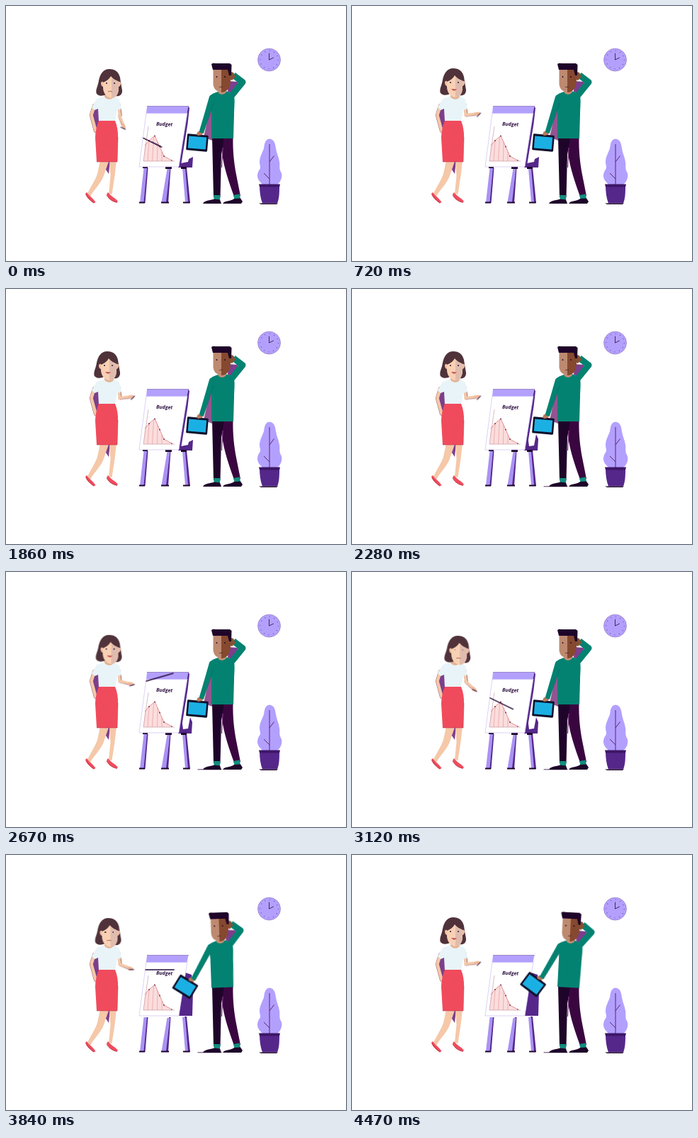
Animation of 480x360 px, one loop 4500 ms. Source, as an HTML page:

```html
<!DOCTYPE html>
<html lang="en">
<head>
<meta charset="utf-8">
<title>Budget talk</title>
<style>
  html, body { margin: 0; width: 100%; height: 100%; overflow: hidden; background: #fff; }
  svg { display: block; width: 100vw; height: 100vh; }

  .ink { fill: #1e0429; }
  .lilac { fill: #b3a0fd; }
  .violet { fill: #55278a; }
  .shade { fill: #7c3f8c; }
  .skin { fill: #f5c8a8; }
  .red { fill: #f04b5c; }
  .green { fill: #038271; }
  .line { fill: none; stroke: #27083a; stroke-width: .8; stroke-linecap: round; stroke-linejoin: round; }
  .limb { fill: none; stroke-linecap: round; stroke-linejoin: round; }

  .move { animation: 4.5s ease-in-out infinite; }
  .cut { animation: 4.5s step-end infinite; }

  .w-head { animation-name: w-head; transform-origin: 145px 128px; }
  .w-fore { animation-name: w-fore; transform-origin: 160px 154px; }
  .stick { animation-name: stick; transform-origin: 181px 154px; }
  .w-eyes { animation-name: blink; transform-origin: 144px 108px; }
  .smile { animation-name: smile; }
  .frown { animation-name: frown; }
  .m-body { animation-name: m-body; transform-origin: 306px 186px; }
  .m-arm { animation-name: m-arm; transform-origin: 291px 128px; }
  .tablet { animation-name: tablet; transform-origin: 275px 180px; }
  .back-a { animation-name: back-a; }
  .back-b { animation-name: back-b; }
  .back-c { animation-name: back-c; }
  .gap { animation-name: gap; }
  .floor { animation-name: floor; }
  .tip { animation-name: tip; }

  @keyframes w-head {
    0% { transform: translate(3px, 1px); }
    13%, 54% { transform: none; }
    66%, 72% { transform: translate(6px, 2px) rotate(1deg); }
    85.3% { transform: translate(1.5px, 1px); }
    97%, 100% { transform: none; }
  }
  @keyframes w-fore {
    0% { transform: rotate(69deg); }
    13%, 54% { transform: rotate(-6deg); }
    66%, 72% { transform: rotate(43deg); }
    85.3% { transform: rotate(22deg); }
    97%, 100% { transform: rotate(-6deg); }
  }
  @keyframes stick {
    0% { transform: rotate(-43deg); }
    13%, 54% { transform: rotate(-39deg); }
    66%, 72% { transform: rotate(-17deg); }
    85.3% { transform: rotate(-22deg); }
    97%, 100% { transform: rotate(-39deg); }
  }
  @keyframes blink {
    0%, 66% { transform: none; }
    68%, 71% { transform: scaleY(.35); }
    73%, 100% { transform: none; }
  }
  @keyframes smile { 0% { opacity: 0; } 10% { opacity: 1; } 60% { opacity: 0; } 92% { opacity: 1; } }
  @keyframes frown { 0% { opacity: 1; } 10% { opacity: 0; } 60% { opacity: 1; } 92% { opacity: 0; } }
  @keyframes m-body {
    0%, 72% { transform: none; }
    81%, 86% { transform: rotate(-2.2deg); }
    97%, 100% { transform: rotate(3deg); }
  }
  @keyframes m-arm {
    0%, 72% { transform: none; }
    81%, 86% { transform: rotate(13deg); }
    97%, 100% { transform: rotate(10deg); }
  }
  @keyframes tablet {
    0%, 72% { transform: none; }
    81%, 86% { transform: rotate(16deg); }
    97%, 100% { transform: rotate(19deg); }
  }
  @keyframes back-a { 0% { opacity: 1; } 42% { opacity: 0; } }
  @keyframes back-b { 0% { opacity: 0; } 42% { opacity: 1; } 76% { opacity: 0; } }
  @keyframes back-c { 0% { opacity: 0; } 76% { opacity: 1; } }
  @keyframes gap { 0% { opacity: 1; } 76% { opacity: 0; } }
  @keyframes floor { 0% { opacity: 0; } 42% { opacity: 1; } }
  @keyframes tip { 0% { opacity: 0; } 28% { opacity: 1; } 36% { opacity: 0; } }
</style>
</head>
<body>
<svg viewBox="0 0 480 360">
  <defs>
    <clipPath id="board"><path d="M199 141H258L256 151 244 227H188L198 151Z"/></clipPath>
  </defs>

  <!-- clock -->
  <circle class="lilac" cx="371.5" cy="76" r="16" stroke="#8a6cb8" stroke-width=".6"/>
  <circle cx="371.5" cy="76" r="12.8" fill="none" stroke="#5a3a8c" stroke-width="1.2" stroke-dasharray=".8 5.902"/>
  <path class="line" d="M371.5 67V76L377.5 73"/>

  <!-- plant -->
  <path class="lilac" d="M372 187.500C366 188 365 194 364 201C362 207 358 213 358 220C358 225 360 227 358.500 230C354 236 354 242 357.500 247L362 252H383C388 249 391 240 388.500 235C385 229 387 226 386 220C385 213 382 208 381 201C380 193 378 188 372 187.500Z"/>
  <path d="M372 195V252M372 220L378.500 211.500M372 244L364 236" fill="none" stroke="#5a2577"/>
  <path class="violet" d="M358 252H386C386 262 386 271 383 278.500H362C359 271 358 262 358 252Z"/>
  <path d="M357 251.500H387L386 255.500H358Z" fill="#3d1666"/>
  <path class="ink" d="M357 278.500H384L382 280H360Z"/>

  <!-- easel -->
  <g class="violet">
    <path class="cut back-a" d="M258 216L264 213 263 228H246L247 222 257 220Z"/>
    <path class="cut back-b" d="M246 228L248 207 250 222 257 221 260 205 263 212 262 228Z"/>
    <path class="cut back-c" d="M253 166L262 169 264 192 263 227H244Z"/>
  </g>
  <path class="violet" d="M198 229H200.500L196.500 278H193ZM230 229H232.500L229 278H224ZM252 228H255L260 278H256Z"/>
  <path fill="#a993f4" d="M194.500 229H199L194.500 277H189ZM227.500 230H231.500L226 277H219.500ZM249 229H253L257 277H253Z"/>
  <path class="ink" d="M188 276.500H196V278.500H188ZM219 276.500H230V278.500H219ZM250 276.500H259.500V278.500H250Z"/>
  <g class="cut gap">
    <path class="ink" d="M193 227H200V229H193ZM225 227H234V230H225ZM247 227H255V230H247Z"/>
    <path class="violet" d="M257 141L259 144 256.500 166 246.500 228H243L255 151Z"/>
  </g>
  <path d="M198 151H256L244 227H188Z" fill="#fff" stroke="#c3b4f3" stroke-width=".6"/>
  <path class="lilac" d="M199 141.500H257.500L255.500 151.500H198Z"/>
  <path d="M199 141.500H258" stroke="#7656a8" stroke-width=".6"/>
  <text x="212" y="169.200" transform="rotate(2 223 168)" font-family="'Open Sans', sans-serif" font-size="7" font-weight="700" font-style="italic" fill="#2d1040">Budget</text>
  <path d="M194 219L196 197 202 190 210 183 217 198.500 223 212 234 218 237 219Z" fill="#fbdddd"/>
  <path d="M200 219L202 190M206.500 219L208.500 185M213.500 219L214 192M220 219V206" stroke="#e5a0a2" stroke-width=".7"/>
  <path d="M201 170L194 219H238" fill="none" stroke="#c08f9b" stroke-width=".6"/>
  <path d="M196 197L202 190 210 183 217 198.500 223 212 234 218" fill="none" stroke="#d66c72" stroke-width=".7"/>
  <g fill="#702b43">
    <circle cx="202" cy="190" r=".9"/><circle cx="210" cy="183.500" r=".9"/><circle cx="217" cy="198.500" r=".9"/>
    <circle cx="223" cy="212" r=".9"/><circle cx="234" cy="218" r=".8"/>
  </g>

  <!-- woman -->
  <path class="shade" d="M123 139L134 130 136 160 130 180 122 162ZM140 218H147L145 237 141 231Z"/>
  <path class="limb" d="M124.500 141L120.500 154 126.500 176" stroke="#8a5370" stroke-width="5.200"/>
  <path class="limb" d="M124.500 141L120.500 154 126.500 176" stroke="#f5c8a8" stroke-width="4.400"/>
  <path class="skin" d="M133 218H145.500L137.500 241C133 252 124 259 119 269L114.500 266C119 256 126 246 129 237Z"/>
  <path class="skin" d="M146 218H156L153.500 240 149.500 266 145 265 147.500 240Z"/>
  <path class="red" d="M114 263C118 269 123 271 126.500 277L124 278.500C119 275 114 271 112 265ZM144 263C148 269 155 271 158 276L156 277.500C150 276 144 272 142 266Z"/>
  <path d="M142 267C146 274 151 276 157 277.500M113 266C117 273 120 275 124 278" fill="none" stroke="#96273d" stroke-width=".6"/>
  <path class="limb" d="M159 138L161.500 154" stroke="#7b4a68" stroke-width="4.400"/>
  <path class="limb" d="M158.500 138L161 154" stroke="#f5c8a8" stroke-width="4"/>
  <path d="M121 143L128 131 140 127H152L160 132 163 145 157 147 154 163H131L130 145 125 147Z" fill="#e8f4f8"/>
  <path class="red" d="M131 162H154C157 169 158.500 178 158 186L157 220H128L126 186C126 178 128 169 131 162Z"/>
  <path d="M158 185L157 220H128" fill="none" stroke="#a92f50" stroke-width=".5"/>
  <g class="move w-fore">
    <path class="limb" d="M161 154.200H175" stroke="#85536a" stroke-width="4.300"/>
    <path class="limb" d="M160 154L175 153.700" stroke="#f5c8a8" stroke-width="3.800"/>
    <ellipse cx="177" cy="154" rx="4" ry="2.400" fill="#efb898"/>
    <path class="move stick line" d="M175 154H182" style="stroke-width:1.200"/>
  </g>
  <g clip-path="url(#board)">
    <g class="move w-fore"><path class="move stick line" d="M181 154H239" style="stroke-width:1.300"/></g>
  </g>
  <path class="cut tip ink" d="M215.500 117H217V118H215.500Z"/>
  <path d="M139 119H152V128C150 133 142 133 139 128Z" fill="#e6b293"/>
  <g class="move w-head">
    <path d="M143 88C134 88 130 95 128 104C127 112 123.500 116 124.500 122C127 127 134 126 138 124L152 126C157 127 161.500 124 161 118C160 112 159 107 158 100C156 92 151 88 143 88Z" fill="#50323a"/>
    <path d="M145 98C150 104 154 104 156 106V115C156 125 151 129 146 129C139 128 134 122 134 114V107C139 105 143 102 145 98Z" fill="#f8d1b4"/>
    <path d="M146 100C150 104 154 104 156 106V115C156 125 151 129 146 129Z" fill="#dfbcae"/>
    <path d="M134 106C130 104 130 112 134 113ZM156 106C160 104 160 112 156 113Z" fill="#efbf9f"/>
    <g class="move w-eyes ink"><circle cx="139" cy="108" r=".9"/><circle cx="150" cy="108" r=".9"/></g>
    <path class="cut smile" d="M140 117Q144 122 148 117.500Z" fill="#c74f56"/>
    <path class="cut frown" d="M141 120Q144 118.500 147 120" fill="none" stroke="#9b4e50" stroke-width=".8"/>
  </g>

  <!-- man -->
  <path class="cut floor line" d="M271 278.800H304"/>
  <path fill="#3a0640" d="M303 185H320.500C320 205 322 222 325 238L331 268 322 269C315 249 308 230 305 208Z"/>
  <path class="ink" d="M291 185H308L304 210 302.500 270H293Z"/>
  <path d="M306 200L304.500 228" stroke="#7e3f80" stroke-width="1.200"/>
  <path d="M293 267H302.500L302 275H294ZM321 267L330 265.500 331 273 323 275Z" fill="#128d7e"/>
  <path class="ink" d="M278 279C280 274 288 275 294 272.500L302 273.500 304 279ZM306 279C309 274 318 276 322 272L331 271.500 334 276 332 279Z"/>
  <g class="move m-body">
    <path class="cut gap" d="M291 140V190L279 185 286 154Z" fill="#925592"/>
    <path class="shade" d="M314 106L328 107 321 124 313 121Z"/>
    <path class="limb" d="M319 126L334 107.500 321 97.500" stroke="#038271" stroke-width="9" style="stroke-linecap:butt"/>
    <path d="M315 92L321 94 324 100 319 105 315 103Z" fill="#865134"/>
    <path class="green" d="M288 128C290 123 297 122 301 120.500H312L321 124C324 130 322 143 322 153L321 187H290V145Z"/>
    <path d="M300 113H311V121C309 126 301 126 299.500 121.500Z" fill="#c98f74"/>
    <path d="M292.500 90H305V122C296 121 293 116 292.500 110Z" fill="#bd8a70"/>
    <path d="M304 90H317V106C316 117 311 122 304 122Z" fill="#86492f"/>
    <path class="ink" d="M290 82C292 80 295 81 298 81H316L318.500 83 318 98 315 98 313 90H292Z"/>
    <g class="ink"><circle cx="297.500" cy="100" r=".9"/><circle cx="309" cy="100" r=".9"/></g>
    <path d="M301 114.500L306 114" stroke="#3a1c22" stroke-width=".7"/>
    <g class="move m-arm">
      <g class="move tablet">
        <g transform="rotate(5 270 193)">
          <rect x="255" y="181.500" width="30" height="23" rx="1.500" fill="#10102a"/>
          <rect x="257.500" y="184.500" width="25" height="17" fill="#1bb0e4"/>
        </g>
        <path d="M271 177L278 178 277 182 271 183 269 181Z" fill="#b97a5c"/>
      </g>
      <path class="green" d="M287 128C290 123 295 125 295 130L289 149 278.500 180 272.500 178 281 149Z"/>
      <path d="M293 137L289 149 278.500 180" fill="none" stroke="#155c5b" stroke-width=".5"/>
    </g>
  </g>
</svg>
</body>
</html>
```
